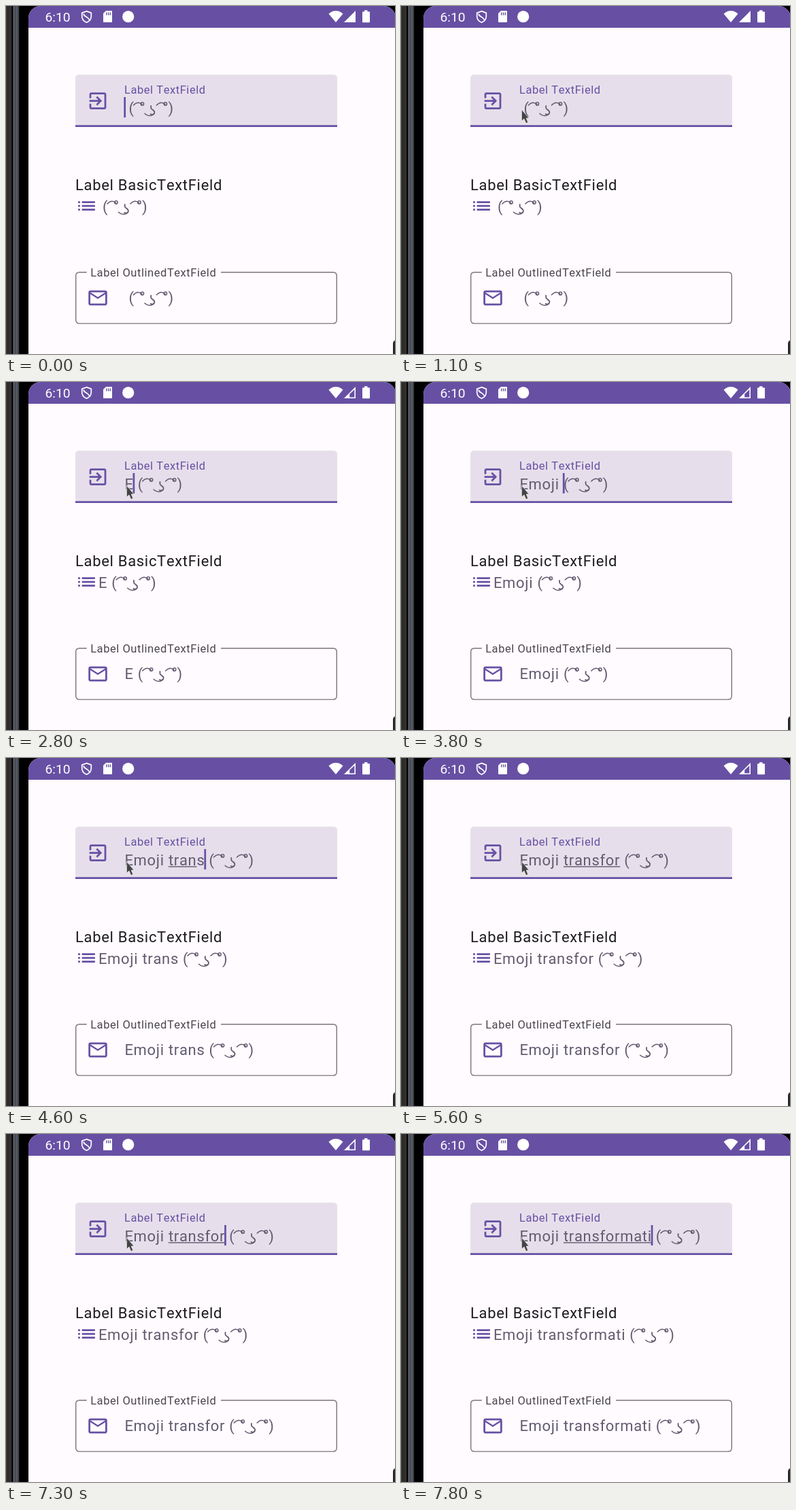
Recreate the animation shown at these times as an HTML page. Size 572 px wide and 512 px high, loop 8 s.

```html
<!DOCTYPE html>
<html lang="en">
<head>
<meta charset="utf-8">
<title>Text field suffix</title>
<style>
  html, body { margin: 0; width: 100%; height: 100%; overflow: hidden; background: #000; }
  svg { display: block; width: 572px; height: 512px; }
  text { font-family: Roboto, "Open Sans", sans-serif; font-kerning: none; white-space: pre; }
  .body { font-size: 22px; letter-spacing: .6875px; }
  .label { font-size: 16.5px; letter-spacing: .55px; }
  .input { fill: #625b71; }
  .primary { fill: #6750a4; }
  .line { fill: none; stroke: #625b71; stroke-width: 1.5; stroke-linecap: round; }
  .white { fill: #fff; }
</style>
</head>
<body>
<svg viewBox="0 0 572 512">
  <defs>
    <linearGradient id="bezel" x1="0" x2="33" gradientUnits="userSpaceOnUse">
      <stop offset="0" stop-color="#47433f"/>
      <stop offset=".06" stop-color="#2b2928"/>
      <stop offset=".23" stop-color="#353231"/>
      <stop offset=".26" stop-color="#050505"/>
      <stop offset=".31" stop-color="#0a0a0a"/>
      <stop offset=".34" stop-color="#77797e"/>
      <stop offset=".39" stop-color="#3c4047"/>
      <stop offset=".46" stop-color="#555b64"/>
      <stop offset=".55" stop-color="#464b53"/>
      <stop offset=".6" stop-color="#000"/>
    </linearGradient>
    <clipPath id="screen"><rect x="33" y="0" width="540" height="560" rx="18"/></clipPath>
    <g id="face">
      <text class="body input" x="6.1">(</text>
      <text class="body input" x="64">)</text>
      <g class="line">
        <path id="eye" d="M13 -12Q19.5 -18.6 25.5 -13.4"/>
        <circle cx="26" cy="-14" r="2.2"/>
        <path d="M47 -12Q53.5 -18.6 59.5 -13.4"/>
        <circle cx="60" cy="-14" r="2.2"/>
        <path d="M29.5 .2Q36 6.4 43 1.2"/>
        <path d="M38.8 -11V-8C38.8 -5.5 44 -5.5 44 -1.5C44 1.5 40.5 2.5 38.3 1" stroke-width="1.8"/>
      </g>
    </g>
  </defs>

  <rect width="572" height="512"/>
  <rect width="33" height="512" fill="url(#bezel)"/>
  <g clip-path="url(#screen)">
    <rect x="33" width="540" height="512" fill="#fffbfe"/>
    <rect x="33" width="540" height="32" class="primary"/>
  </g>
  <path d="M572 492q-3 1-3 5v15h3z" fill="#262626"/>

  <!-- status bar -->
  <g class="white">
    <text x="57.5" y="23" font-size="19.25">6:10</text>
    <path d="M118.5 7.6l6.8 2.6v5.1c0 4.4-2.9 7.4-6.8 9-3.9-1.6-6.8-4.6-6.8-9v-5.1z"
          fill="none" stroke="#fff" stroke-width="1.7"/>
    <path d="M114 11.5C115 17 121 15 122.5 20.5" fill="none" stroke="#fff" stroke-width="1.7"/>
    <path d="M147 7h8q1 0 1 1v15q0 1-1 1h-11q-1 0-1-1V11z"/>
    <path d="M147.8 9.5v4M150.6 9.5v4M153.4 9.5v4" stroke="#6750a4" stroke-width="1.4"/>
    <circle cx="179.7" cy="15.7" r="8.6"/>
    <path d="M485 24L474.5 11.5Q485 2.6 495.5 11.5z"/>
    <path d="M514 7v17h-17z"/>
    <path id="signal" class="primary" d="M505.2 17.8L512.4 11V22.4H505.2z"/>
    <path d="M527 8.3v-2h4.5v2h2.5q1 0 1 1v14q0 1-1 1h-9q-1 0-1-1v-14q0-1 1-1z"/>
  </g>

  <!-- filled field -->
  <path d="M102 178V106.5q0-5.5 5.5-5.5h374q5.5 0 5.5 5.5V178z" fill="#e6dfeb"/>
  <rect x="102" y="175.25" width="385" height="2.75" class="primary"/>
  <path class="primary" transform="translate(118.5 123) scale(1.375)" d="M10.09 15.59L11.5 17l5-5-5-5-1.41 1.41L12.67 11H3v2h9.67zM19 3H5c-1.11 0-2 .9-2 2v4h2V5h14v14H5v-4H3v4c0 1.1.89 2 2 2h14c1.1 0 2-.9 2-2V5c0-1.1-.9-2-2-2z"/>
  <text class="label primary" x="174" y="128.7">Label TextField</text>

  <!-- basic field -->
  <text class="body" x="102" y="271" fill="#1c1b1f">Label BasicTextField</text>
  <path class="primary" transform="translate(102 277.5) scale(1.375)" d="M3 7h2v2H3zM3 11h2v2H3zM3 15h2v2H3zM7 7h14v2H7zM7 11h14v2H7zM7 15h14v2H7z"/>

  <!-- outlined field -->
  <path d="M118.7 391.7H108q-5.3 0-5.3 5.3v64.8q0 5.3 5.3 5.3h373q5.3 0 5.3-5.3V397q0-5.3-5.3-5.3H316"
        fill="none" stroke="#79747e" stroke-width="1.4"/>
  <path class="primary" transform="translate(118.5 413) scale(1.375)" d="M22 6c0-1.1-.9-2-2-2H4c-1.1 0-2 .9-2 2v12c0 1.1.9 2 2 2h16c1.1 0 2-.9 2-2V6zm-2 0l-8 5-8-5h16zm0 12H4V8l8 5 8-5v10z"/>
  <text class="label" x="124.2" y="397.8" fill="#49454f">Label OutlinedTextField</text>

  <g id="inputs"></g>
  <rect id="under" class="input" y="159.2" height="1.4"/>
  <rect id="caret" class="primary" y="134" width="2.75" height="30"/>
  <path id="handle" class="primary" d="M174.8 163.8L184.9 173.9A14.25 14.25 0 1 1 164.7 173.9z"/>
  <path id="mouse" d="M.4 .4V17.2L4 14 6.8 20.6 9.8 19.2 7.2 13H11.2z" fill="#444" stroke="#eee" stroke-width=".7"/>
</svg>

<script>
const LOOP = 8000, GAP = 6.14;
const WORDS = 'Emoji transformati';
// time, letters shown, letters underlined
const TYPING = [
  [0, 0, 0], [2800, 1, 0], [2900, 1, 1], [3100, 2, 1], [3200, 3, 3], [3400, 4, 4],
  [3600, 5, 4], [3700, 5, 5], [3800, 6, 0], [4100, 8, 8], [4400, 9, 9], [4500, 10, 10],
  [4600, 11, 10], [4800, 13, 13], [5100, 14, 0], [5300, 14, 14], [6000, 13, 13],
  [6200, 12, 12], [6700, 11, 11], [7100, 12, 0], [7300, 14, 14], [7400, 15, 0],
  [7600, 16, 0], [7700, 17, 17], [7800, 18, 18]
];
const CARET_OFF = [[300, 600], [1100, 1500], [2200, 2600], [5600, 6000]];
const START = 174.4;

const $ = id => document.getElementById(id);
const make = (tag, attrs) => {
  const el = document.createElementNS('http://www.w3.org/2000/svg', tag);
  for (const k in attrs) el.setAttribute(k, attrs[k]);
  return $('inputs').appendChild(el);
};
const show = (el, on) => el.style.opacity = +on;

const inputs = [[START, 158], [START - 38.5, 303], [START, 437]].map(([x, y]) => ({
  x, y,
  text: make('text', { class: 'body input', x, y }),
  face: make('use', { href: '#face' })
}));

function type(count, marked) {
  const word = WORDS.slice(0, count).trimEnd();
  let width = 0;
  for (const { x, y, text, face } of inputs) {
    if (text.textContent !== word) text.textContent = word;
    width = word ? text.getComputedTextLength() : 0;
    face.setAttribute('transform', `translate(${x + width} ${y})`);
  }
  const field = inputs[0].text;
  const measure = n => n ? field.getSubStringLength(0, n) : 0;
  const from = measure(marked > 6 ? 6 : 0);
  $('under').setAttribute('x', START + from);
  $('under').setAttribute('width', marked ? measure(marked) - from : 0);
  const space = count > word.length ? GAP : 0;
  $('caret').setAttribute('x', START + width + space - 1.1);
}

// Eases down to an overshoot, then settles on the field.
function pointer(t) {
  const u = Math.min(1, (t - 300) / 600), e = u * (2 - u);
  const back = Math.min(1, Math.max(0, (t - 900) / 200));
  return [111 + 78 * e - 12 * back, 17 + 142 * e - 7 * back];
}

function draw(now) {
  const t = Math.floor(now % LOOP / 100) * 100;
  const [, count, marked] = TYPING.filter(s => s[0] <= t).pop();
  type(count, marked);
  show($('caret'), !CARET_OFF.some(([a, b]) => t >= a && t < b));
  show($('handle'), t >= 1600 && t < 2800 ? (t < 1700 ? .5 : 1) : 0);
  show($('signal'), t >= 1500);
  show($('mouse'), t >= 300);
  $('mouse').setAttribute('transform', `translate(${pointer(Math.max(300, t))})`);
}

let begin;
function tick(now) {
  begin ??= now;
  draw(now - begin);
  requestAnimationFrame(tick);
}
draw(0);
requestAnimationFrame(tick);
</script>
</body>
</html>
```
